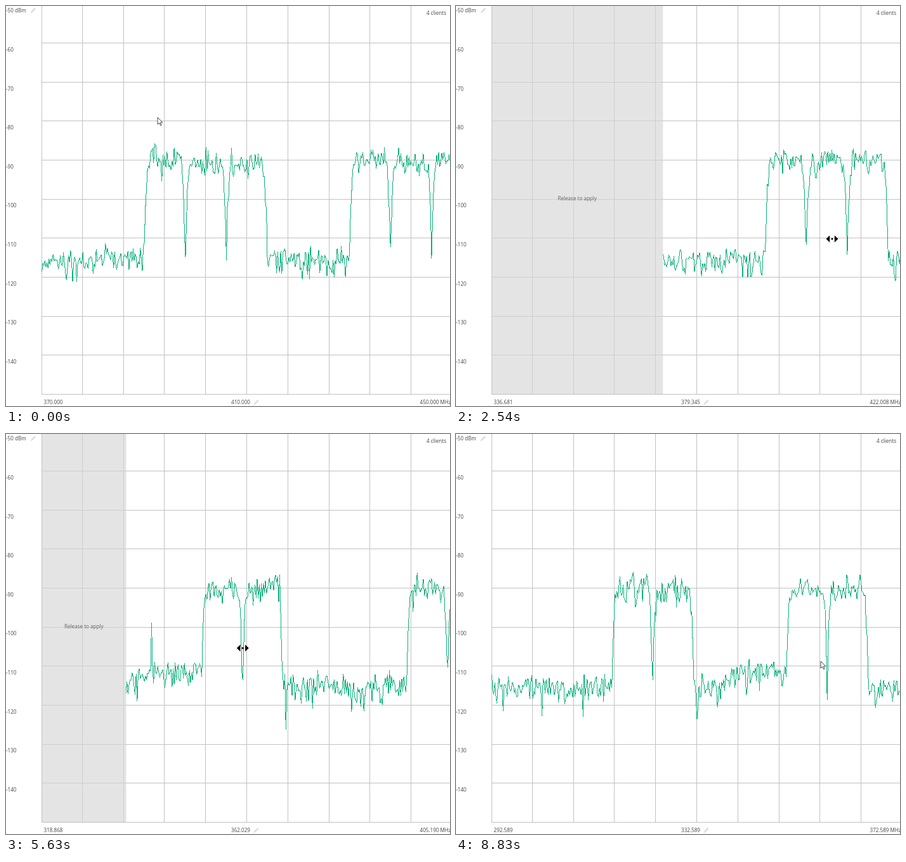
Animation of 700x632 px, one loop 8.89 s. Source, as an HTML page:

```html
<!DOCTYPE html>
<html lang="en">
<head>
<meta charset="utf-8">
<title>Spectrum panning</title>
<style>
  html, body { margin: 0; width: 100%; height: 100%; overflow: hidden; background: #fff; }
  svg { display: block; width: 100%; height: 100%; }
  text { font: 8.1px "Open Sans", "Noto Sans", sans-serif; fill: #444; }
  .grid { stroke: #c2c2c2; shape-rendering: crispEdges; fill: none; }
  .trace { stroke: #0cb07c; shape-rendering: crispEdges; fill: none; }
  .note { fill: #666; text-anchor: middle; }
</style>
</head>
<body>
<svg viewBox="0 0 700 632" xmlns="http://www.w3.org/2000/svg">
  <defs>
    <g id="pencil" stroke="#dcdcdc" fill="#dcdcdc">
      <path d="M-2.6 2.6L3 -3" stroke-width="2.6"/>
      <path d="M-4.4 4.4L-3.6 1.8L-1.8 3.6Z" stroke="none"/>
    </g>
  </defs>
  <path class="grid" id="grid"/>
  <path class="trace" id="trace"/>
  <g id="pull">
    <rect id="shade" x="57" y="0" height="613" fill="#d5d5d5" fill-opacity=".64"/>
    <text class="note" id="note" y="306.8"></text>
    <g id="dots" fill="#666"></g>
  </g>
  <g id="scale"></g>
  <text x="694" y="13.5" text-anchor="end">4 clients</text>
  <text id="left" x="59.5" y="629"></text>
  <text id="middle" x="370" y="629" text-anchor="middle"></text>
  <text id="right" x="652.5" y="629"></text>
  <use href="#pencil" x="43" y="7"/>
  <use href="#pencil" x="394.5" y="626"/>
  <g id="cursor">
    <path id="arrow" d="M0 0V11L2.6 8.7L4.5 12.8L6.2 12L4.4 8H7.8Z" fill="#fff" stroke="#333" stroke-width=".9"/>
    <g id="pan">
      <path d="M-9.5 0L-3.8 -5.5V5.5ZM9.5 0L3.8 -5.5V5.5Z"/>
      <path id="panVertical" d="M0 -9.5L-5 -3.8H5ZM0 9.5L-5 3.8H5Z"/>
      <circle r="1.5"/>
    </g>
  </g>
</svg>
<script>
const $ = id => document.getElementById(id);
const LOOP = 8890, SWEEP = 150, SPAN = 80, BINS = 400;
const X0 = 56.5, PX_PER_MHZ = 8.084, ROW = 61.62, COLUMN = 64.775, TOP = 58.7;
const toY = dbm => TOP + (-60 - dbm) / 10 * ROW;
const show = (el, on) => el.setAttribute('display', on ? 'inline' : 'none');
const lerp = (a, b, u) => a + (b - a) * u;
const clamp = u => Math.max(0, Math.min(1, u));
const ease = (t, start, duration) => {
  const u = clamp((t - start) / duration);
  return u * u * (3 - 2 * u);
};

// Each view is pulled right by `pulled` MHz; the two end labels trail the hand.
const VIEWS = [
  { from: 0, left: 370, pulled: 34.732, hover: 950, press: 1200, release: 2900, drop: 3190,
    low: t => ease(t, 1290, 1424), high: t => ease(t, 1632, 1266.5) },
  { from: 4180, left: 335.268, pulled: 42.679, hover: 4950, press: 5080, release: 6420, drop: 6720,
    low: t => ease(t, 5250, 902.4), high: t => ease(t, 5267, 1152.8) },
  { from: 7660, left: 292.589, pulled: 0, release: LOOP, low: () => 0, high: () => 0 }
];

const POINTER_START = { x: 239, y: 176 };
const POINTER_MOVES = [
  { start: 150, duration: 780, x: 313, y: 364 },
  { start: 1230, duration: 1220, x: 593, y: 368 },
  { start: 3190, duration: 700, x: 589, y: 373 },
  { start: 4460, duration: 490, x: 185, y: 335 },
  { start: 5180, duration: 850, x: 530, y: 341 },
  { start: 6720, duration: 380, x: 589, y: 200 },
  { start: 8310, duration: 490, x: 575, y: 359 }
];

// Transmissions are runs of 8 MHz channels.
const CHANNEL = 8;
const BURSTS = [
  { start: 316, channels: 2 }, { start: 350, channels: 2 },
  { start: 390, channels: 3 }, { start: 430, channels: 3 }
];

function level(f, t) {
  const burst = BURSTS.find(b => f >= b.start && f < b.start + b.channels * CHANNEL);
  if (burst) {
    const inside = (f - burst.start) % CHANNEL;
    const edge = Math.min(inside, CHANNEL - inside);
    return -114 + 24 * (1 - Math.exp(-((edge / .35) ** 1.2)));
  }
  const spike = t < 8000 && Math.abs(f - 340.3) < .1;
  if (spike) return -97;
  const raised = f < 350 ? 4 * clamp((f - 335.5) / 5) : 0;
  return -115.4 + raised;
}

function randomizer(seed) {
  return () => {
    seed = (seed + 0x6D2B79F5) | 0;
    let n = Math.imul(seed ^ seed >>> 15, 1 | seed);
    n = n + Math.imul(n ^ n >>> 7, 61 | n) ^ n;
    return ((n ^ n >>> 14) >>> 0) / 4294967296;
  };
}

function tracePath(left, offset, t, sweep) {
  const random = randomizer(sweep * 7919 + 17);
  // Averaged noise power in dB, which dips further than it peaks.
  const noise = () => {
    let power = 0;
    for (let i = 0; i < 5; i++) power -= Math.log(1 - random());
    return 10 * Math.log10(power / 5);
  };
  let d = '';
  for (let i = 0; i <= BINS; i++) {
    const mhz = i * SPAN / BINS;
    const x = X0 + offset + mhz * PX_PER_MHZ;
    const y = toY(level(left + mhz, t) + noise());
    d += `${i ? 'L' : 'M'}${x.toFixed(1)} ${y.toFixed(1)}`;
  }
  return d;
}

function placeDots(elapsed, width) {
  [...$('dots').children].forEach((dot, i) => {
    const u = clamp(elapsed / 1000 - i / 6);
    show(dot, u > 0);
    dot.setAttribute('cx', 57 + width * .507 * (1 - (1 - u) ** 2));
  });
}

function placeCursor(t, view) {
  let { x, y } = POINTER_START;
  for (const move of POINTER_MOVES) {
    const u = ease(t, move.start, move.duration);
    x = lerp(x, move.x, u);
    y = lerp(y, move.y, u);
  }
  const panning = t >= view.hover && t < view.drop;
  show($('arrow'), !panning);
  show($('pan'), panning);
  show($('panVertical'), t < view.press);
  $('cursor').setAttribute('transform', `translate(${x.toFixed(1)} ${y.toFixed(1)})`);
}

function draw(t) {
  const view = VIEWS.filter(v => v.from <= t).pop();
  const pulled = view.pulled * view.low(t);
  const offset = pulled * PX_PER_MHZ;
  const from = view.left - pulled;
  const to = view.left + SPAN - view.pulled * view.high(t);
  const sweep = Math.floor(Math.min(t, view.release) / SWEEP);

  $('trace').setAttribute('d', tracePath(view.left, offset, t, sweep));
  $('left').textContent = from.toFixed(3);
  $('middle').textContent = ((from + to) / 2).toFixed(3);
  $('right').textContent = to.toFixed(3) + ' MHz';

  show($('pull'), offset > 0);
  $('shade').setAttribute('width', offset);
  $('note').setAttribute('x', X0 + offset / 2);
  $('note').textContent = t < view.release ? 'Release to apply' : 'Loading...';
  placeDots(t - view.release - 230, offset);
  placeCursor(t, view);
}

function build() {
  let grid = '', scale = '';
  for (let i = 0; i < 10; i++) {
    const x = Math.max(56, Math.floor(55.62 + COLUMN * i)) + .5;
    const y = Math.floor(TOP + ROW * i) + .5;
    grid += `M${x} 0V613M56 ${y}H700`;
    scale += `<text x="0" y="${10.3 + ROW * i}">-${50 + 10 * i}${i ? '' : ' dBm'}</text>`;
  }
  $('grid').setAttribute('d', grid);
  $('scale').innerHTML = scale;
  $('dots').innerHTML = '<circle cy="311.5" r="1.4"/>'.repeat(5);
}

build();
const began = performance.now();
function tick() {
  draw((performance.now() - began) % LOOP);
  requestAnimationFrame(tick);
}
tick();
</script>
</body>
</html>
```
